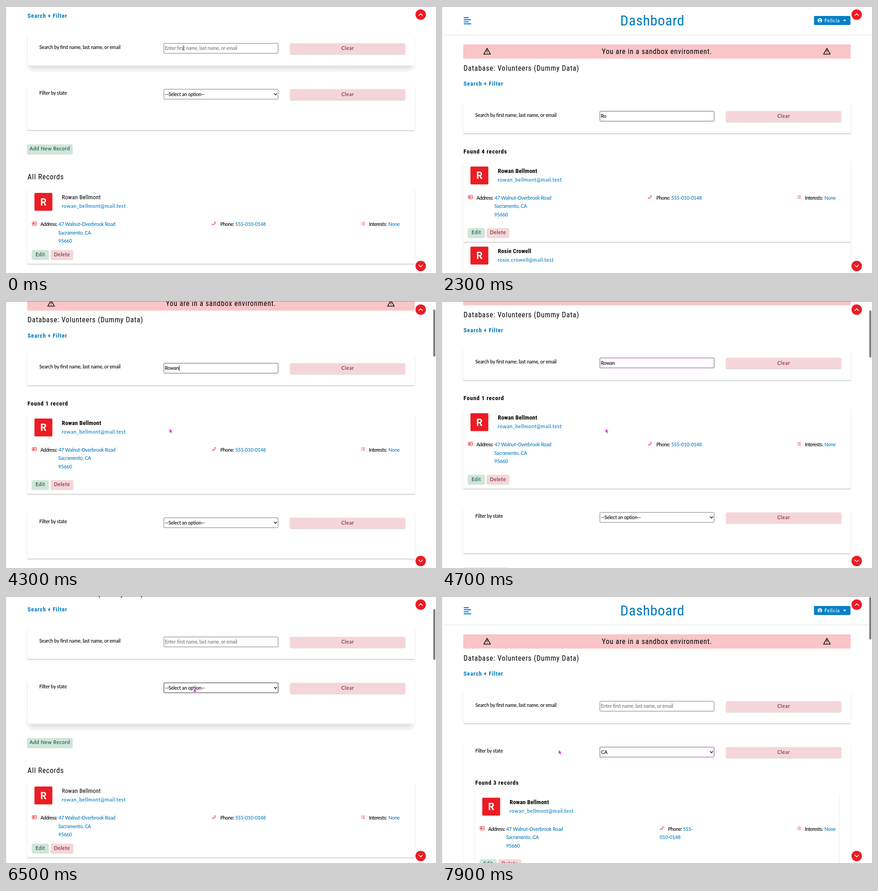
Write an HTML page that moves like this. It is 949 by 590 pixels and loops after 8000 ms.

```html
<!DOCTYPE html>
<html lang="en">
<head>
<meta charset="utf-8">
<title>Dashboard</title>
<style>
html, body { margin: 0; width: 100%; height: 100%; overflow: hidden; background: #fff; }
svg { display: block; width: 949px; height: 590px; }
text { font-family: Lato, sans-serif; font-size: 10.7px; font-weight: 500; letter-spacing: -.22px; white-space: pre; }
.head { font-family: "Roboto Condensed", Roboto, sans-serif; font-size: 16px; font-weight: 400; font-stretch: 75%; letter-spacing: .8px; }
.title { font-size: 32px; letter-spacing: .65px; }
.sub { font-size: 13.1px; }
.name { font-size: 13px; letter-spacing: .2px; }
.initial { font-family: Roboto, sans-serif; font-size: 21.5px; letter-spacing: 0; fill: #fff; }
.bold { font-weight: 700; }
.blue { fill: #0079be; }
.wide { font-size: 11px; letter-spacing: .55px; }
.tag { letter-spacing: -.45px; }
.mid { text-anchor: middle; }
.menu { font-family: Inter, sans-serif; font-size: 11px; font-weight: 400; fill: #fff; letter-spacing: 0; }
.card { fill: #fff; filter: drop-shadow(0 2px 1px rgba(0,0,0,.19)); }
.btn { filter: drop-shadow(0 1.5px 1px rgba(0,0,0,.22)); }
.field { fill: #fff; stroke: #767676; }
.line { fill: none; stroke-linecap: round; stroke-linejoin: round; }
</style>
</head>
<body>
<svg id="stage" viewBox="0 0 949 590"></svg>
<script>
const LOOP = 8000;
const RED = '#ec1c24', BLUE = '#0681c8', PINK = '#f5d6d8', GREEN = '#cfe6da', WINE = '#74202b', PINE = '#1c5138';
const STATES = 'AL AK AZ AR CA CO CT DE DC FL GA HI ID IL IN IA KS KY LA ME MD MA MI'.split(' ');

const text = (x, y, s, cls = '', attrs = '') => `<text x="${x}" y="${y}" class="${cls}" ${attrs}>${s}</text>`;
const rect = (x, y, w, h, attrs = '') => `<rect x="${x}" y="${y}" width="${w}" height="${h}" ${attrs}/>`;
const path = (d, attrs = '') => `<path d="${d}" ${attrs}/>`;
const group = (id, body, attrs = '') => `<g id="${id}" ${attrs}>${body}</g>`;

const button = (x, y, w, h, s, fill, ink) =>
  rect(x, y, w, h, `rx="2" fill="${fill}" class="btn"`) +
  text(x + w / 2, y + h / 2 + 3.2, s, 'wide mid', `fill="${ink}"`);

const clear = (id, y) => group(id, button(627, y, 254, 23.5, 'Clear', PINK, WINE));

const warning = x => path(`M${x} 93.5l7.3 13h-14.6z`, 'class="line" stroke="#111" stroke-width="1.6"') +
  path(`M${x} 97.5v4.3m0 1.5v1.2`, 'stroke="#111" stroke-width="1.5"');

const arrowButton = (y, dir) => `<circle cx="915.2" cy="${y}" r="11.5" fill="${RED}"/>` +
  path(`M911.2 ${y + 2 * dir}l4 ${-4 * dir}l4 ${4 * dir}`, 'class="line" stroke="#fff" stroke-width="1.7"');

// Soft raised shadow under a hovered card.
const lift = (id, top, bottom) => group(id,
  rect(46, bottom - 30, 857, 44, 'rx="15" fill="#f3f3f3"') +
  rect(53, bottom - 20, 842, 28, 'rx="9" fill="#e5e5e5"') +
  rect(47.5, top, 855, bottom - top, 'fill="#fff" stroke="#f4f4f4"') +
  rect(46, top - 1, 858, 8, 'fill="#fff"'));

function record(x, y, o) {
  const right = 949 - x, gap = o.tight ? 126 : 136;
  const phone = o.wrap
    ? text(506, 73, '555-', 'blue') + text(454.5, 91.3, '010-0148', 'blue')
    : text(506, 73, '555-010-0148', 'blue');
  return `<g transform="translate(0 ${y})">` +
    rect(x, -10, right - x, gap + 40, 'class="card"') +
    rect(x + 15.8, -.3, 39.5, 39.5, `rx="2" fill="${RED}"`) +
    text(x + 35.5, 27.2, 'R', 'initial bold mid') +
    text(x + 76.3, 13.6, o.name, 'head name' + (o.tight ? '' : ' bold')) +
    text(x + 76, 32.6, o.mail, 'blue wide') +
    `<g transform="translate(${x - 47} 0)">` +
    rect(58, 63.5, 9.6, 7.5, `rx="1" fill="none" stroke="${RED}"`) +
    path('M60 66h2.6v2.6h-2.6zM64 66h2M64 68.4h2', `stroke="${RED}" fill="${RED}" stroke-width=".9"`) +
    text(76, 73, 'Address:', 'tag') + text(116, 73, '47 Walnut-Overbrook Road', 'blue') +
    text(115.5, 91.3, 'Sacramento, CA', 'blue') + text(115.5, 109.6, '95660', 'blue') +
    path('M456 70.5c3.5 0 6.5-3 6.7-6.4l-2-.5-1 2 1 1c-.6 1.2-1.4 2-2.6 2.6l-1-1-2 1z',
      `class="line" stroke="${RED}" stroke-width=".9"`) +
    text(473, 73, 'Phone:', 'tag') + phone +
    button(57.5, gap, 36.5, 20, 'Edit', GREEN, PINE) + button(99, gap, 49, 20, 'Delete', PINK, WINE) +
    '</g>' +
    path('M783.5 64.5h1.5m1.5 0h5.5M783.5 67.3h1.5m1.5 0h5.5M783.5 70.1h1.5m1.5 0h5.5', `stroke="${RED}" stroke-width=".9"`) +
    text(801, 73, 'Interests:', 'tag') + text(844, 73, 'None', 'blue') + '</g>';
}

const first = { name: 'Rowan Bellmont', mail: 'rowan_bellmont@mail.test' };
const second = { name: 'Rosie Crowell', mail: 'rosie.crowell@mail.test' };

const header =
  path('M48 25.8h11M48 30.4h16M48 35h11M48 39.4h16.5', `stroke="${BLUE}" stroke-width="2.2"`) +
  text(464.3, 42.5, 'Dashboard', 'head title blue mid') +
  rect(0, 63.5, 949, 1, 'fill="#e2e2e2"') +
  rect(821, 22, 80.5, 20, `rx="2" fill="${BLUE}"`) +
  '<circle cx="834" cy="32" r="5" fill="#fff"/>' +
  `<circle cx="834" cy="30.5" r="1.6" fill="${BLUE}"/>` +
  path('M831 35q3-3.4 6 0q-3 2.4-6 0z', `fill="${BLUE}"`) +
  text(844, 35.6, 'Felicia', 'wide', 'fill="#fff"') +
  path('M885 30.5h7l-3.5 3.6z', 'fill="#fff"') +
  rect(47, 84.7, 855, 31.6, 'rx="1.5" fill="#f9c5c7"') + warning(99.5) + warning(849.5) +
  text(474.4, 106, 'You are in a sandbox environment.', 'head mid') +
  text(47.5, 142.5, 'Database: Volunteers (Dummy Data)', 'head') +
  text(47.5, 176, 'Search + Filter', 'head sub bold blue');

const search =
  group('searchCard', rect(47, 212, 855, 69, 'class="card"')) + lift('searchLift', 212, 281) +
  text(73.5, 244.5, 'Search by first name, last name, or email') +
  rect(348.5, 232.5, 252, 22, 'rx="1" class="field" id="input"') +
  text(350.5, 247.3, '', '', 'id="typed"') + rect(0, 237.5, 1, 12, 'id="caret"') +
  clear('clearTop', 232.5);

const filter =
  group('filterCard', rect(47, 326, 855, 98, 'class="card"')) + lift('filterLift', 326, 424) +
  path('M47.5 332v300M902.5 332v300', 'id="filterSides" stroke="#f2f2f2"') +
  text(73.5, 346, 'Filter by state') +
  rect(348.5, 333.9, 252, 22, 'rx="1" class="field" id="select"') +
  text(351, 348.8, '', '', 'id="choice"') +
  path('M592 343.5l2.8 3l2.8-3', 'class="line" stroke="#111" stroke-width="1.5"') +
  clear('clearLow', 334);

const below =
  button(47, 456, 99.5, 20.5, 'Add New Record', GREEN, PINE) +
  text(47.5, 533.3, 'All Records', 'head') +
  record(47, 563.4, { ...first, tight: true });

const found = (id, x, y, body) => group(id, text(x, y, 'Found 3 records', 'head sub bold', `id="${id}Title"`) + body);

document.getElementById('stage').innerHTML =
  group('page', header + search +
    found('hits', 47.5, 326, group('hit2', record(47, 532, second)) + record(47, 355, first)) +
    group('filter', filter + group('below', below)) +
    found('inState', 73.5, 417, record(73, 446, { ...first, wrap: true }))) +
  group('menu', rect(341, 191, 256, 420, 'rx="5" fill="#666"') +
    path('M348.5 204l2 2.6l3.8-5.4', 'class="line" stroke="#fff" stroke-width="1.4"') +
    STATES.map((s, i) => text(358, 207.5 + i * 17.05, s, 'menu')).join('')) +
  arrowButton(19, 1) + arrowButton(574.5, -1) +
  rect(943, 2, 4.5, 100, 'id="thumb" rx="2.2" fill="#7d7d7d"') +
  rect(0, 0, 949, 1, 'fill="#8a8a8a"') + rect(0, 1, 1, 589, 'fill="#e6e6e6"') +
  group('arrow', path('M0 0v9.2l2.2-1.9l1.6 3.4l1.7-.8l-1.5-3.2h2.8z', 'fill="#f01ee0" stroke="#fbd3f7" stroke-width=".7"')) +
  group('beam', path('M-2-5q2 0 2 1.5v7q0 1.5-2 1.5M2-5q-2 0-2 1.5v7q0 1.5 2 1.5', 'fill="none" stroke="#d63ad0" stroke-width="1.1"')) +
  group('hand', path('M-2-4.5q1-1 1.8 0l1 3l4 .8q1.2.5 1 2l-.8 4h-5l-3-3.5q0-1.2 1.6-.6z', 'fill="#f01ee0" stroke="#fbd3f7" stroke-width=".7"'));

const el = {};
document.querySelectorAll('[id]').forEach(n => el[n.id] = n);

// Keyframes as [time, value].
const SCROLL = [[100, 150], [800, 0], [3700, 0], [4300, 95], [4600, 110], [5200, 66], [5750, 66], [6400, 142], [7400, 142], [7800, 0]];
const MOUSE_X = [[3600, 468], [4200, 361], [4800, 361], [5500, 643], [5700, 643], [6400, 414.5], [6700, 414.5], [7200, 378], [7400, 378], [7800, 257.5]];
const MOUSE_Y = [[3600, 242], [4200, 282], [4800, 282], [5500, 184], [5700, 184], [6400, 204], [6700, 204], [7200, 272], [7400, 272], [7800, 340]];
const TYPING = [[900, 'R'], [1500, 'Ro'], [2500, 'Row'], [2900, 'Rowa'], [3300, 'Rowan'], [5700, '']];
const CARET_OFF = [[1200, 1500], [2300, 2500], [2700, 2900], [3500, 3900], [4700, 5100]];
const SCROLLING = [[100, 1100], [3800, 5400], [5750, 6600], [7450, 8000]];

const within = (spans, t) => spans.some(([a, b]) => t >= a && t < b);

function track(keys, t) {
  const i = keys.findIndex(k => k[0] > t);
  if (i === 0) return keys[0][1];
  if (i < 0) return keys[keys.length - 1][1];
  const [t0, a] = keys[i - 1], [t1, b] = keys[i], u = (t - t0) / (t1 - t0);
  return a + (b - a) * u * u * (3 - 2 * u);
}

const show = (n, on) => n.style.display = on ? '' : 'none';
const place = (n, x, y) => n.setAttribute('transform', `translate(${x} ${y})`);
const set = (n, k, v) => n.setAttribute(k, v);

function draw(t) {
  const y = track(SCROLL, t);
  const typed = TYPING.reduce((s, [at, v]) => t >= at ? v : s, '');
  const many = typed && t < 2900, chosen = t >= 7400;
  const shift = many ? 771 : typed ? 240 : 0;
  const early = t < 900, seen = early || t >= 3600;
  const mx = early ? 391.5 : track(MOUSE_X, t), my = early ? 93 : track(MOUSE_Y, t);
  const over = (x0, x1, y0, y1) => seen && mx >= x0 && mx <= x1 && my + y >= y0 && my + y <= y1;
  const menu = t >= 6700 && t < 7400;

  place(el.page, 0, -y);
  place(el.filter, 0, shift);

  el.typed.textContent = typed || 'Enter first name, last name, or email';
  set(el.typed, 'fill', typed ? '#000' : '#757575');
  const focus = t >= 100 && t < 5500;
  el.input.style.stroke = focus ? '#83408f' : '';
  show(el.caret, focus && !within(CARET_OFF, t));
  set(el.caret, 'x', 351 + (typed ? el.typed.getComputedTextLength() : 0));

  show(el.hits, typed);
  show(el.hit2, many);
  el.hitsTitle.textContent = many ? 'Found 4 records' : 'Found 1 record';
  show(el.inState, chosen);
  show(el.below, !chosen);
  el.choice.textContent = chosen ? 'CA' : '--Select an option--';
  el.select.style.stroke = chosen ? '#83408f' : over(348, 601, 334 + shift, 356 + shift) ? '#222' : '';

  show(el.searchLift, over(47, 902, 212, 281));
  show(el.filterLift, !chosen && (menu || over(47, 902, 326 + shift, 424 + shift)));
  show(el.filterSides, chosen);
  show(el.filterCard, !chosen);

  const onClear = over(627, 881, 230, 256);
  place(el.clearTop, 0, onClear ? -3 : 0);
  set(el.clearTop.children[0], 'fill', onClear ? '#831f28' : PINK);
  set(el.clearTop.children[1], 'fill', onClear ? PINK : WINE);

  show(el.menu, menu);
  const height = chosen ? 3700 : 3100 + shift;
  show(el.thumb, within(SCROLLING, t));
  set(el.thumb, 'y', 2 + y * 590 / height);
  set(el.thumb, 'height', 590 * 590 / height);

  const onInput = over(348, 601, 232, 255);
  show(el.hand, onClear);
  show(el.beam, onInput);
  show(el.arrow, seen && !onInput && !onClear);
  [el.hand, el.beam, el.arrow].forEach(n => place(n, mx, my));
}

function tick(now) {
  draw(now % LOOP);
  requestAnimationFrame(tick);
}
draw(0);
requestAnimationFrame(tick);
</script>
</body>
</html>
```
